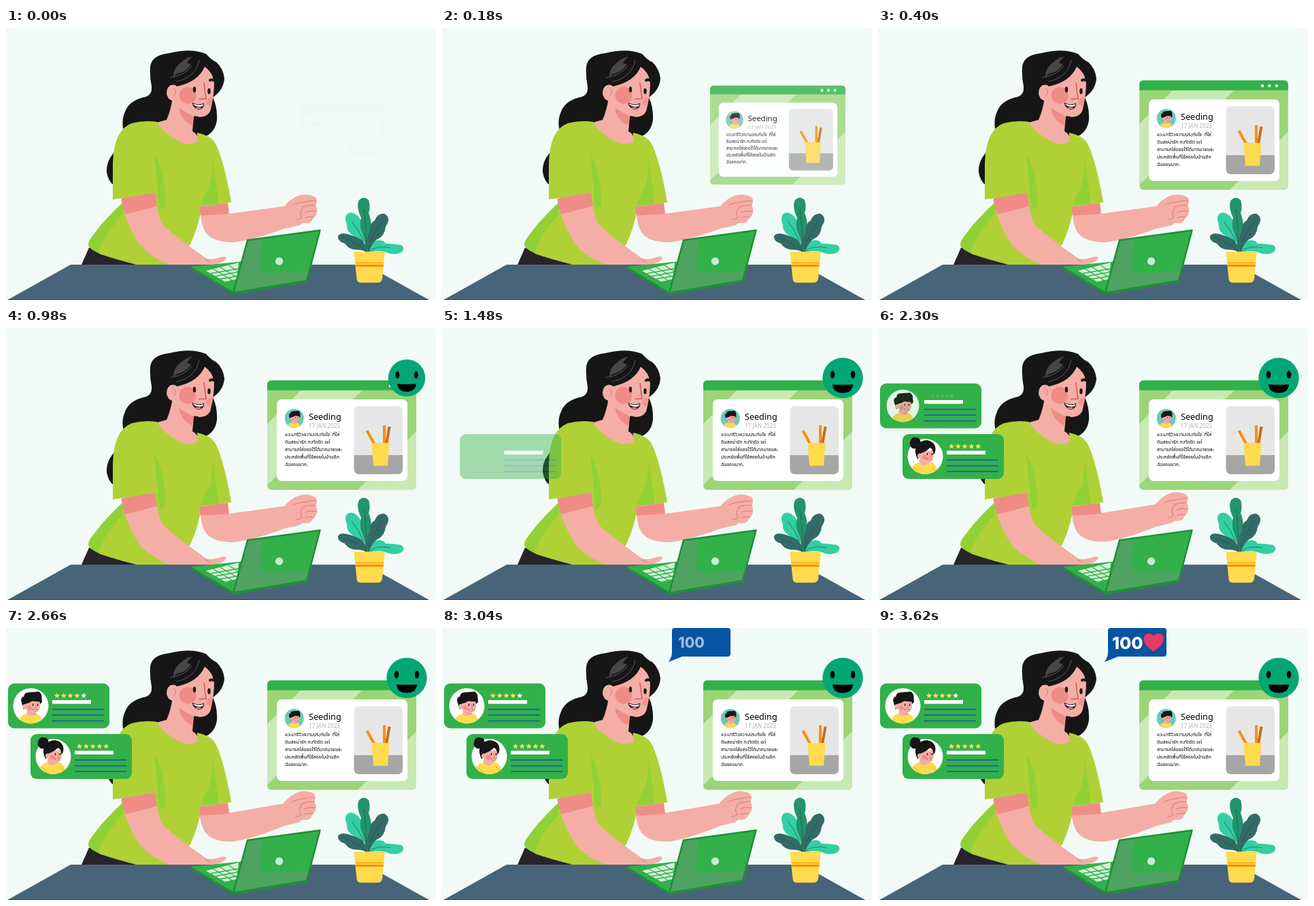
Write an HTML page that moves like this. It is 632 by 400 pixels and loops after 4.02 s.

```html
<!DOCTYPE html>
<html lang="en">
<head>
<meta charset="utf-8">
<title>Seeding</title>
<style>
html, body { margin: 0; height: 100%; overflow: hidden; background: #f1faf6; }
svg { display: block; width: 100vw; height: 100vh; }
text { font-family: 'Noto Sans', sans-serif; white-space: pre; }
#review text { font-family: 'Noto Sans Thai', 'Noto Sans Thai Looped', 'Noto Sans', sans-serif; }
.skin { fill: #f4aea6; }
.blush { fill: #ef8c86; }
.shirt { fill: #afd136; }
.fold { fill: #92d136; }
.hair { fill: #161616; }
.green { fill: #32b04a; }
.yellow { fill: #ffdb4d; }
.line { fill: none; stroke: #e5757a; stroke-width: 1; stroke-linecap: round; stroke-linejoin: round; }
</style>
</head>
<body>
<svg viewBox="0 0 632 400">
<defs>
  <clipPath id="disc"><circle r="26"/></clipPath>
  <clipPath id="window"><rect x="384" y="77" width="219" height="161" rx="6"/></clipPath>
  <clipPath id="photo"><rect x="511.5" y="115" width="71.5" height="100" rx="7"/></clipPath>
  <path id="star" d="M0-4.2 1.2-1.4 4.1-1.2 1.9.7 2.6 3.6 0 2-2.6 3.6-1.9.7-4.1-1.2-1.2-1.4Z"/>
  <g id="man" clip-path="url(#disc)">
    <path class="yellow" d="M-19 30Q-18 14-8 12L8 11Q17 14 18 30Z"/>
    <path class="skin" d="M-6 4V12Q0 18 7 12V5Z"/>
    <path class="blush" d="M-2 9Q3 12 7 10V13Q2 13-2 9Z"/>
    <path class="hair" d="M-11 5-13-3Q-17-12-10-14Q-10-20-2-20L12-21Q17-17 16-10Q18-6 14-3L8 0Z"/>
    <path class="skin" d="M-8-3Q-2-4 2-7L13-6Q15 2 11 8Q6 12-1 8Q-6 5-7 2Z"/>
    <circle class="skin" cx="-9" cy="1" r="3.5"/>
    <circle class="blush" cx="-2" cy="3" r="3"/>
    <path d="M3-3V0M10-3V0" stroke="#161616" stroke-width="1.4"/>
    <path d="M2 5Q6 7 10 5Q8 9 5 8Q3 7 2 5Z" fill="#fff" stroke="#8a3030" stroke-width=".6"/>
    <path class="line" d="M7-3 8 3H6"/>
  </g>
  <g id="girl" clip-path="url(#disc)">
    <path class="yellow" d="M-25 30Q-22 12-10 9L6 7Q17 10 21 28Z"/>
    <path class="skin" d="M-8 2-9 9Q-2 17 6 9V3Z"/>
    <path d="M-17 16Q-10 20-8 27M10 14Q14 18 15 24" fill="none" stroke="#f0a928"/>
    <path class="skin" d="M-8-8 12-9Q14 3 9 7Q3 10-5 5L-9 0Z"/>
    <circle class="blush" cx="-1" cy="1" r="3.5"/>
    <path d="M3-5V-2M10-5V-2" stroke="#161616" stroke-width="1.4"/>
    <path d="M2 3Q6 5 9 3Q8 7 5 6Z" fill="#fff" stroke="#8a3030" stroke-width=".6"/>
    <path class="line" d="M7-5 8 1H6"/>
  </g>
  <g id="girlHair" class="hair">
    <path d="M-9-14Q-17-9-21-14Q-24-18-22-23Q-20-29-14-28Q-8-28-7-22Z"/>
    <path d="M-11 4Q-17-6-13-15Q-8-24 3-24Q14-22 15-12Q15-5 12-3Q12-10 7-13Q1-7-6-5Z"/>
    <circle class="skin" cx="-8" cy="-1" r="3.5"/>
  </g>
</defs>

<path fill="#486478" d="M95 348H529L622 400H2Z"/>
<path stroke="#3b5166" d="M3 399.5H621"/>

<!-- woman -->
<path class="hair" d="M212 58Q213 40 240 37Q272 29 294 38Q303 48 309 50Q319 59 321 74Q320 91 304 102Q311 117 310 135Q308 153 292 160L230 165 173 152Q169 136 175 123Q181 106 206 101Q215 98 214 86Q211 70 212 58Z"/>
<path class="hair" d="M162 180Q147 194 148 212Q150 225 159 232Z"/>
<path fill="#29232b" d="M122 323 111 348H192Z"/>
<path class="fold" d="M172 256Q155 272 140 289L126 307Q120 315 121 320Q124 326 138 332L172 342 200 290Z"/>
<path class="shirt" d="M185 140Q204 135 222 138Q246 168 280 168L281 154Q302 158 309 172Q321 198 331 256L288 262Q281 300 268 323L270 348H192Q160 340 137 332Q138 312 172 274V250L157 252V200Q158 150 185 140Z"/>
<path class="fold" d="M218 184Q236 219 234 262L226 267 222 243 224 242Q220 214 218 184Z"/>
<path class="fold" d="M304 193Q308 225 313 259L288 262Q285 257 296 238Q304 222 304 193Z"/>
<path class="skin" d="M245 102Q242 122 236 135L222 139Q232 154 251 165Q265 174 281 168Q284 157 274 152L276 130 290 125Z"/>
<path class="blush" d="M254 117 276 130 274 143Q258 138 254 117Z"/>
<path class="skin" d="M250 86Q282 80 292 57Q304 65 306 80Q306 98 301 119Q299 130 285 131Q266 127 254 117L243 106Z"/>
<ellipse class="skin" cx="245.500" cy="95" rx="9.500" ry="11.500"/>
<path class="line" d="M247 89Q252 93 247 100"/>
<circle class="blush" cx="267" cy="99" r="12.500"/>
<path class="blush" d="M303 101Q295 104 294 110Q296 115 301 115Z" opacity=".7"/>
<g class="hair">
  <ellipse cx="277" cy="90.500" rx="2.200" ry="4.200"/>
  <ellipse cx="298.500" cy="93" rx="2.200" ry="4.200"/>
</g>
<path d="M300 77Q303 75 306 77" fill="none" stroke="#161616" stroke-width="4" stroke-linecap="round"/>
<path class="line" style="stroke:#d9525a;stroke-width:1.500" d="M291 81 294 104 284 104.500"/>
<path fill="#3a2226" stroke="#3a2226" stroke-linejoin="round" d="M274 110Q282 115 291 111Q291 119 283 119.500Q275 118 274 110Z"/>
<path fill="#fff" d="M275 111Q282 115 290.500 112L289 115Q281 117 276 113Z"/>
<path class="blush" d="M278 117.500Q283 115.500 287 118Q283 120.500 278 117.500Z"/>
<path fill="#474747" d="M246 72Q245 60 258 50Q266 43 274 42Q267 48 266 52L272 53Q266 63 256 66Q249 68 246 72Z"/>
<path fill="none" stroke="#5a5a5a" d="M241 73Q262 70 273 56M250 79Q279 73 284 47"/>

<g id="arm">
  <path class="skin" d="M286 272 328 273Q374 267 409 262Q419 250 432 246Q445 243 455 249Q459 254 455 261Q459 267 456 274Q454 279 451 280Q449 288 440 287Q435 286 432 290Q418 293 409 295Q366 311 336 315Q304 316 293 300Q286 288 286 272Z"/>
  <path class="line" d="M422 260Q431 256 439 256Q448 254 455 254M455 261Q445 260 437 263Q430 272 435 279M456 270Q446 268 440 271M452 279Q446 276 440 279M427 282Q433 281 435 279"/>
</g>
<path class="blush" d="M284 263 326 257 328 273 286 276Z"/>
<path class="shirt" d="M312 245 329 246 331 256 313 259Z"/>

<path class="skin" d="M174 272 221 260Q225 282 232 291Q257 313 293 338Q300 342 312 338Q323 334 324 338Q321 345 307 348H240Q208 334 196 318Q183 298 174 272Z"/>
<path class="line" d="M293 341Q298 342 301 345"/>
<path class="blush" d="M169 251 219 242 222 262 175 274Z"/>

<!-- laptop -->
<path fill="#219038" d="M271 351 334 387 443 370V374L334 392 271 354Z"/>
<path class="green" d="M272 351 350 343 360 380 334 388Z"/>
<path fill="#d5f2d8" d="M294 357 342 345 340 369 322 373Z"/>
<path fill="none" stroke="#32b04a" stroke-width="1.300" d="M301 361 346 353M308 365 346 358M315 369 346 364M304 354 334 372M315 352 342 368M327 349 346 361"/>
<path fill="#4da35f" d="M355 312 461.500 297.500 442 371.500 334 389.500Z"/>
<path class="green" d="M377 310 460 299 444.500 357 385 360Q373 360 374 349Z"/>
<path fill="none" stroke="#1e9038" stroke-width="2.500" stroke-linejoin="round" d="M355 312 461.500 297.500 442 371.500 334 389.500Z"/>
<circle cx="401.500" cy="343" r="5.700" fill="#c8ecd0"/>

<!-- plant -->
<path fill="#33cfa3" d="M526 319Q512 316 511 306Q500 299 501 289Q497 279 501 274Q506 269 514 274Q523 280 523 292Q528 302 526 319Z"/>
<path fill="#33cfa3" d="M533 330Q536 313 548 312Q555 312 558 317Q568 317 580 319Q588 323 581 330Q570 335 559 330Q549 326 533 330Z"/>
<path fill="#23936b" d="M528 330Q528 310 523 300Q519 291 522 279Q514 263 519 253Q526 246 533 253Q536 264 533 272Q539 287 535 300Q532 315 531 330Z"/>
<path fill="#336b66" d="M532 330Q528 308 535 299Q534 287 542 283Q546 272 556 273Q567 279 558 292Q557 306 545 311Q537 318 533 330Z"/>
<path fill="#336b66" d="M531 330Q529 317 522 311Q512 306 508 305Q492 299 488 306Q487 314 498 317Q504 326 515 326Q524 326 531 330Z"/>
<path fill="none" stroke="#1f5a52" stroke-width=".7" d="M530 329Q530 300 526 266M531 329Q538 305 553 284M530 329Q516 315 499 310M532 329Q545 319 565 323M526 314Q518 296 508 284"/>
<path class="yellow" d="M511.500 330Q512 329 514 329H555Q557 330 556.500 332L553 369Q552 374 547 374.500H521Q516 374 515.500 369Z"/>
<path stroke="#ffa000" stroke-width="1.600" d="M513.500 345.500H555"/>
<path stroke="#ff8a00" stroke-width="3" d="M513.800 349.500H554.500"/>

<!-- review window -->
<g id="panel">
  <g clip-path="url(#window)">
    <path fill="#9bd577" d="M384 77H603V238H384Z"/>
    <path fill="#c9e9b3" d="M433 92H523L384 231V141ZM603 152V238H517Z"/>
    <path class="green" d="M384 77H603V91.500H384Z"/>
  </g>
  <path stroke="#fff" stroke-width="4.500" stroke-linecap="round" d="M565 85h0M575.500 85h0M586 85h0"/>
  <rect x="398" y="105" width="192" height="120" rx="7" fill="#fff"/>
  <g transform="translate(423.700 133) scale(.54)"><circle r="26" fill="#6cc9b8"/><use href="#man"/></g>
  <text x="445" y="135" font-size="12.600" font-weight="500">Seeding</text>
  <text x="445" y="147" font-size="8.200" fill="#b0b0b0">17 JAN 2023</text>
  <g id="review" font-size="7"></g>
  <g clip-path="url(#photo)">
    <path fill="#e6e6e6" d="M511 115h73v100h-73Z"/>
    <path fill="#a6a6a6" d="M511 187h73v28h-73Z"/>
    <path stroke="#f7900d" stroke-width="4" d="M530.500 151 542 172M556 143V171"/>
    <path stroke="#d4690f" stroke-width="4" d="M563.500 145 559 171"/>
    <path class="yellow" d="M537.500 169H563.500L561 202.500H540Z"/>
  </g>
</g>

<g id="smiley">
  <circle cx="589" cy="73.500" r="29.700" fill="#05a676"/>
  <ellipse cx="574" cy="68.500" rx="3.200" ry="5.800"/>
  <ellipse cx="604" cy="68.500" rx="3.200" ry="5.800"/>
  <path d="M574 83Q589 84 604 83Q603 95.500 589 95.500Q575 95.500 574 83Z"/>
</g>

<g id="cards"></g>

<path id="bubble" fill="#0554a2" d="M338 4Q338 0 342 0H420Q424 0 424 4V38Q424 42 420 42H353Q343 46 332.500 50Q338 43 338 36Z"/>
<text id="count" x="344" y="30.500" font-size="25" font-weight="800" fill="#fff" style="font-family:Inter,sans-serif">100</text>
<g id="heart">
  <path fill="#c92f57" d="M405 35Q390 26 390 16Q391 8 398 8Q403 8 405 12Q407 8 412 8Q420 8 420.500 16Q420 26 405 35Z"/>
  <path fill="#e63a62" d="M405 33.500Q391.500 25 391 16Q392 8.500 398 8.500Q403 8.500 405 12.500Q407 8.500 412 8.500Q419 8.500 419 16Q418 25 405 33.500Z"/>
</g>
</svg>
<script>
const LOOP = 4020;
const $ = id => document.getElementById(id);
const clamp = v => Math.min(1, Math.max(0, v));
const easeOut = (p, power = 3) => 1 - (1 - p) ** power;
const smooth = p => p * p * (3 - 2 * p);

$('review').innerHTML = [
  'แวะมารีวิวความประทับใจ  ที่ใส่', 'ดินสอน่ารัก กะทัดรัด แต่', 'สามารถใส่ของไว้ได้มากมายและ',
  'ประหยัดพื้นที่ใช้สอยในบ้านอีก', 'ฉันชอบมาก.'
].map((line, i) => `<text x="410" y="${159 + i * 11}">${line}</text>`).join('');

const cards = [
  { x: 36, y: 156, start: 1380, face: '<use href="#girl"/><use href="#girlHair"/>', stars: 5 },
  { x: 3, y: 81.5, start: 2000, face: '<use href="#man"/>', stars: 4 }
];
$('cards').innerHTML = cards.map((card, n) => `
  <g transform="translate(${card.x} ${card.y})">
    <g id="plate${n}">
      <rect class="green" width="149" height="66" rx="9"/>
      <path fill="#fff" d="M65 24.500h57v5.500h-57Z"/>
      <path stroke="#1f5fa8" stroke-width="1.800" d="M65 38.200h76m-76 8.500h76m-76 8.500h76"/>
    </g>
    <g id="face${n}"><g transform="translate(33.500 33)"><circle r="26" fill="#fff"/>${card.face}</g></g>
    <g id="stars${n}">${[0, 1, 2, 3, 4].map(i =>
      `<use href="#star" x="${72 + i * 9.8}" y="18" fill="${i < card.stars ? '#ffe04d' : '#fff'}"/>`).join('')}</g>
  </g>`).join('');

function pop(id, cx, cy, t, start, duration = 500, fade = 280) {
  const scale = .5 + .5 * easeOut(clamp((t - start) / duration), 3.3);
  $(id).setAttribute('transform', `translate(${cx} ${cy}) scale(${scale}) translate(${-cx} ${-cy})`);
  $(id).setAttribute('opacity', smooth(clamp((t - start) / fade)));
}

function slide(id, t, start) {
  const p = clamp((t - start) / 240);
  $(id).setAttribute('transform', `translate(${-50 * (1 - easeOut(p))})`);
  $(id).setAttribute('opacity', p);
}

function draw(t) {
  pop('panel', 493.5, 157.5, t, -20);
  pop('smiley', 589, 73.5, t, 780, 480, 200);
  cards.forEach(({ start }, n) => {
    slide('plate' + n, t, start);
    pop('face' + n, 33.5, 33, t, start + 140, 380, 210);
    pop('stars' + n, 91.5, 18, t, start + 240, 380, 210);
  });
  const lift = smooth(clamp((t - 2060) / 380));
  $('arm').setAttribute('transform', `rotate(${-2 * lift} 300 310)`);
  pop('bubble', 381, 24, t, 2660, 400, 220);
  pop('count', 366, 21, t, 2900, 460, 250);
  pop('heart', 405, 21, t, 3140);
}

function tick(now) {
  draw(now % LOOP);
  requestAnimationFrame(tick);
}
draw(0);
requestAnimationFrame(tick);
</script>
</body>
</html>
```
